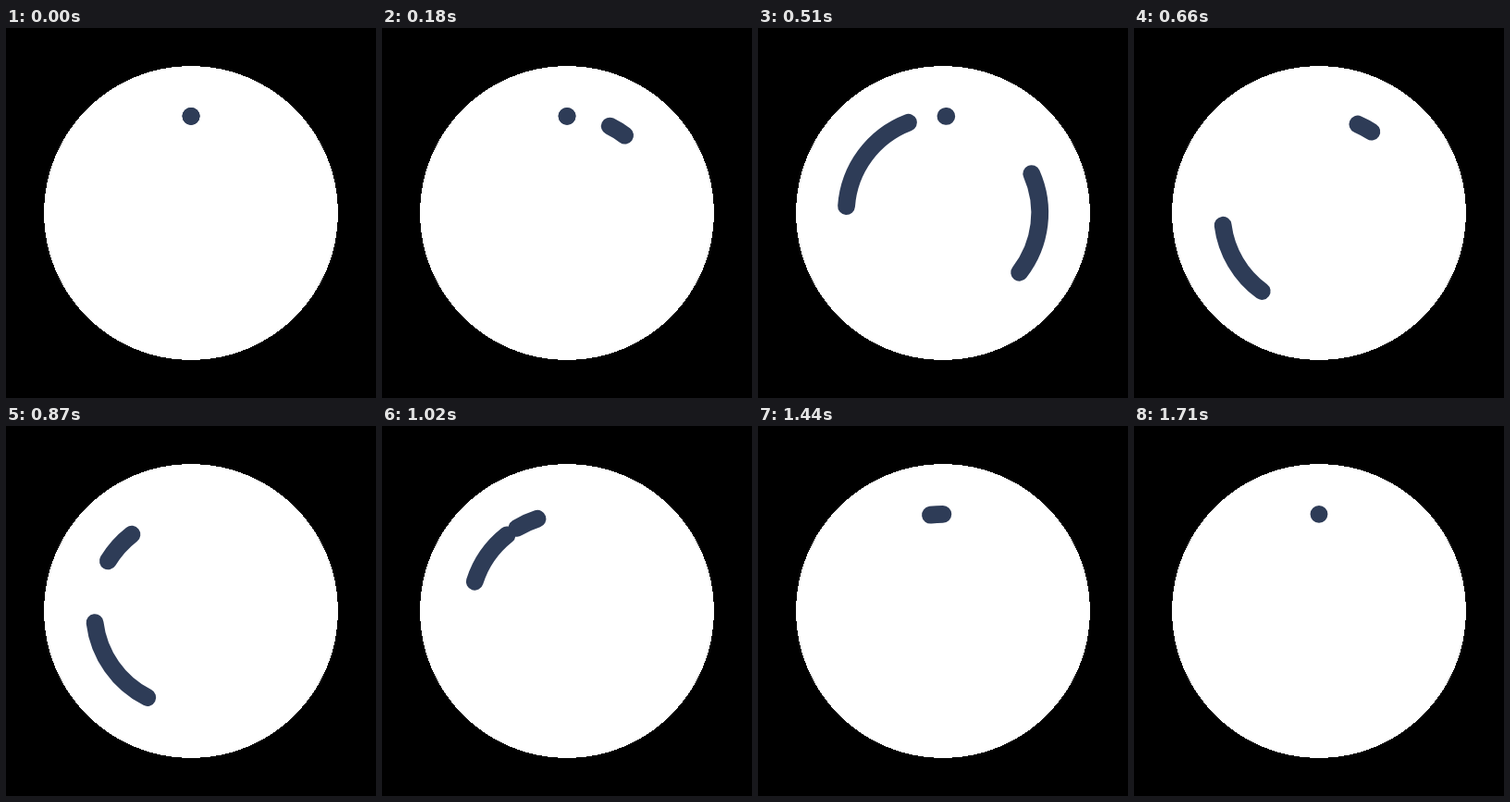
Animation of 400x400 px, one loop 1.77 s. Source, as an HTML page:

```html
<!DOCTYPE html>
<html lang="en">
<head>
<meta charset="utf-8">
<title>Loader</title>
<style>
  html, body { margin: 0; width: 100%; height: 100%; overflow: hidden; background: #000; }
  svg { display: block; width: 100vw; height: 100vh; }
  path { fill: none; stroke: #2e3c57; stroke-width: 18.8; stroke-linecap: round; }
</style>
</head>
<body>
<svg viewBox="0 0 400 400">
  <circle cx="200" cy="200" r="159" fill="#fff" shape-rendering="crispEdges"/>
  <path/><path/><path/>
</svg>
<script>
const LOOP = 1770, STEP = 30, LAST = 1710, THIRD = 580, RADIUS = 104.7;

// Curve with flat ends; x1 and x2 place its two handles in time.
function bezier(x1, x2) {
  return x => {
    let low = 0, high = 1;
    for (let i = 0; i < 24; i++) {
      const s = (low + high) / 2, r = 1 - s;
      if (3 * s * r * r * x1 + 3 * s * s * r * x2 + s ** 3 < x) low = s;
      else high = s;
    }
    return low * low * (3 - 2 * low);
  };
}

// One full turn, in degrees clockwise from the top.
function turn(start, length, ease) {
  return t => 360 * ease(Math.min(Math.max((t - start) / length, 0), 1));
}

const arcs = [
  { head: turn(0, 540, bezier(0.63, 0.9)), tail: turn(0, 580, bezier(0.7, 0.94)) },
  { head: turn(240, 1211, bezier(0.42, -0.08)), tail: turn(240, 1345, bezier(0.42, -0.01)) },
  { head: turn(440, 1025, bezier(0.56, 0.01)), tail: turn(440, 1290, bezier(0.5, 0)) }
];

function point(deg) {
  const a = deg * Math.PI / 180;
  return `${200 + RADIUS * Math.sin(a)} ${200 - RADIUS * Math.cos(a)}`;
}

function arcPath(from, to) {
  const large = to - from > 180 ? 1 : 0;
  return `M${point(from)}A${RADIUS} ${RADIUS} 0 ${large} 1 ${point(to)}`;
}

const paths = document.querySelectorAll("path");

// The arcs leave one by one, at the end of each third.
function draw(t) {
  arcs.forEach(({ head, tail }, i) => {
    const from = tail(t);
    const to = Math.max(head(t), from + 0.05);
    paths[i].setAttribute("d", t < (i + 1) * THIRD ? arcPath(from, to) : "");
  });
}

const start = performance.now();
function tick() {
  const t = (performance.now() - start) % LOOP;
  draw(Math.min(Math.floor(t / STEP) * STEP, LAST));
  requestAnimationFrame(tick);
}
tick();
</script>
</body>
</html>
```
